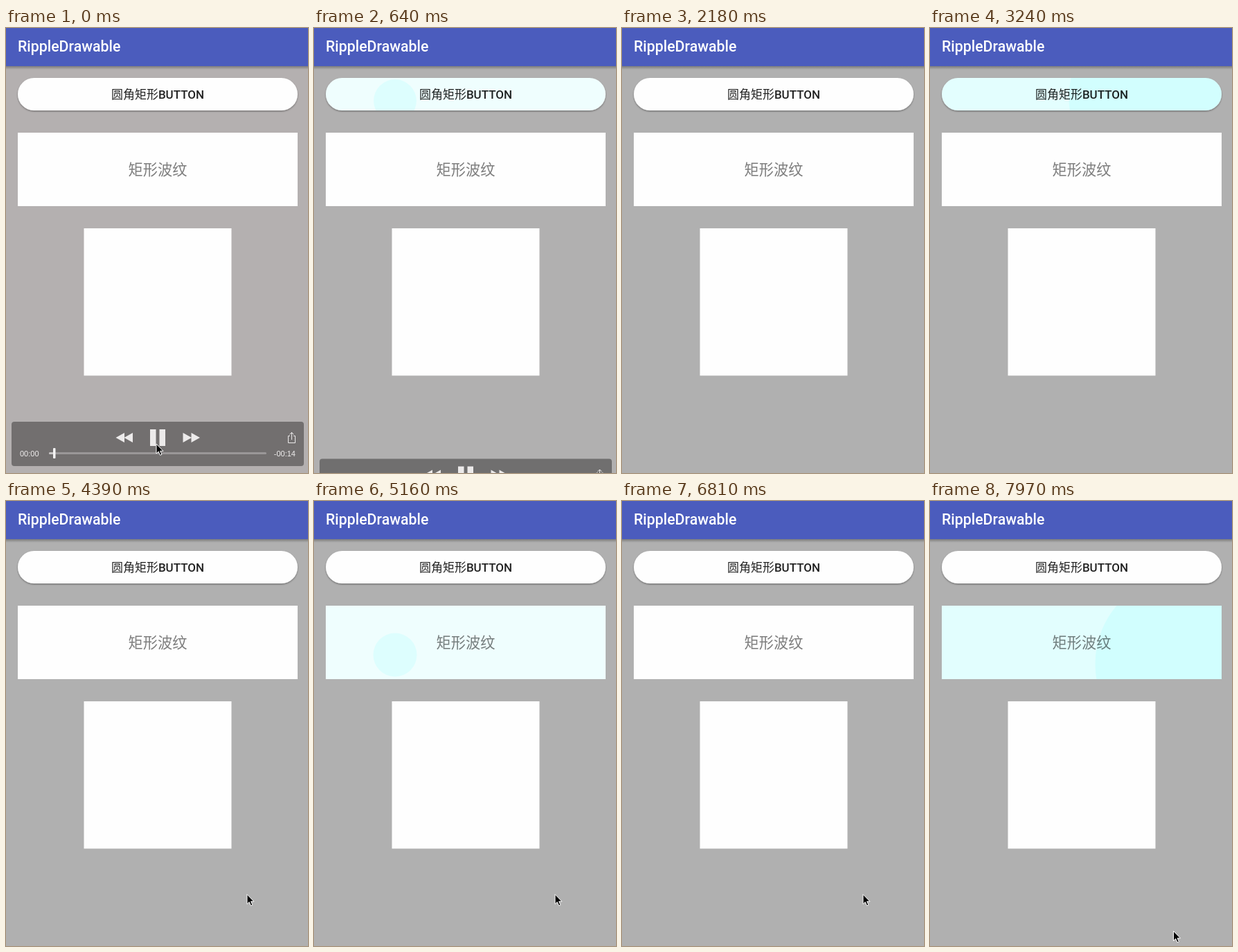
An HTML page for the animation above (8000 ms loop, 436 px wide and 642 px high).

```html
<!DOCTYPE html>
<html lang="zh">
<head>
<meta charset="utf-8">
<title>Ripple</title>
<style>
html, body { margin: 0; width: 100%; height: 100%; overflow: hidden; background: #b0b0b0; }
svg { display: block; width: 436px; height: 642px; }
text { font-family: Roboto, "Noto Sans CJK SC", "Noto Sans CJK", sans-serif; }
.medium { font-weight: 500; }
.panel text { font: 11px "Liberation Sans", Arial, sans-serif; fill: #f0eeee; }
</style>
</head>
<body>
<svg viewBox="0 0 436 642">
  <defs>
    <linearGradient id="shade" x2="0" y2="1">
      <stop stop-color="#000" stop-opacity=".3"/>
      <stop offset="1" stop-color="#000" stop-opacity="0"/>
    </linearGradient>
    <filter id="soft" x="-5%" y="-20%" width="110%" height="150%">
      <feDropShadow dx="0" dy="1.3" stdDeviation="1" flood-opacity=".38"/>
    </filter>
    <clipPath id="pillClip"><rect x="17" y="72" width="404" height="47" rx="23.5"/></clipPath>
    <clipPath id="cardClip"><rect x="17" y="151" width="404" height="106"/></clipPath>
  </defs>

  <rect id="back" width="436" height="642"/>
  <rect y="55" width="436" height="5" fill="url(#shade)"/>
  <rect width="436" height="55" fill="#4b5cbd"/>
  <text class="medium" x="17" y="34" font-size="21.3" fill="#fff">RippleDrawable</text>

  <rect x="17" y="72" width="404" height="47" rx="23.5" fill="#fefefe" filter="url(#soft)"/>
  <g id="pill" clip-path="url(#pillClip)" fill="#0ff">
    <rect x="17" y="72" width="404" height="47"/><circle/>
  </g>
  <text x="219" y="102.3" font-size="17" text-anchor="middle" fill="#000" fill-opacity=".87">圆角矩形<tspan class="medium">BUTTON</tspan></text>

  <rect x="17" y="151" width="404" height="106" fill="#fefefe"/>
  <g id="card" clip-path="url(#cardClip)" fill="#0ff">
    <rect x="17" y="151" width="404" height="106"/><circle/>
  </g>
  <text x="219" y="212" font-size="21.2" text-anchor="middle" fill="#000" fill-opacity=".51">矩形波纹</text>

  <rect x="112.5" y="289" width="213" height="212.5" fill="#fefefe"/>

  <g id="panel" class="panel">
    <rect x="8" y="568" width="422" height="64" rx="4" fill="#000" fill-opacity=".37"/>
    <path fill="#eceaea" d="M171 584V598L158.500 591ZM183 584V598L170.500 591ZM255.500 584V598L268 591ZM267.500 584V598L280 591ZM208 579h8.500v24h-8.500ZM221.500 579h8.500v24h-8.500Z"/>
    <path fill="none" stroke="#eceaea" d="M410 588.500H407.500V598.500H417.500V588.500H415M412.500 594V583.500M409.500 586.500L412.500 583.500L415.500 586.500"/>
    <rect x="62" y="612" width="314" height="3" rx="1.5" fill="#9a9798"/>
    <rect x="62" y="612" width="7" height="3" rx="1.5" fill="#c8c6c6"/>
    <rect x="68" y="606" width="3.500" height="15" rx="1" fill="#f4f3f3"/>
    <text x="20" y="618">00:00</text>
    <text x="418" y="618" text-anchor="end">-00:14</text>
  </g>

  <path id="cursor" d="M0 0V14L3.200 11L5.500 16.300L7.900 15.300L5.600 10.300H10Z" fill="#000" stroke="#fff" stroke-width="1"/>
</svg>
<script>
const LOOP = 8000;
const $ = id => document.getElementById(id);
const clamp = v => Math.min(1, Math.max(0, v));

// start, end, touch point
const presses = {
  pill: [[292, 2180, 117, 105], [2600, 4390, 318, 100]],
  card: [[4810, 6810, 117, 222], [7290, 8000, 368, 235]]
};
const panelY = [[60, 0], [820, 70], [1140, 70], [1300, 75]];
const cursorX = [[60, 217], [3440, 344], [3700, 348], [7700, 348], [7950, 351.5]];
const cursorY = [[60, 600], [420, 660], [3400, 660], [3490, 613], [3700, 567.5], [7700, 567.5], [7950, 620.5]];

// Piecewise linear value of a key list
function track(keys, t) {
  let [t0, v0] = keys[0];
  for (const [t1, v1] of keys) {
    if (t < t1) return t1 > t0 ? v0 + (v1 - v0) * clamp((t - t0) / (t1 - t0)) : v1;
    [t0, v0] = [t1, v1];
  }
  return v0;
}

function ripple(id, t) {
  const press = presses[id].find(([from, to]) => t >= from && t < to);
  const [tint, wave] = $(id).children;
  $(id).style.display = press ? "" : "none";
  if (!press) return;
  const [from, , x, y] = press, age = t - from + 20;
  tint.setAttribute("opacity", 0.12 * clamp(age / 760));
  wave.setAttribute("opacity", 0.076 * clamp(age / 360));
  wave.setAttribute("cx", x);
  wave.setAttribute("cy", y);
  wave.setAttribute("r", Math.max(0, 0.297 * (t - from - 245)));
}

function draw(now) {
  const t = now % LOOP;
  const warm = 1 - clamp((t - 60) / 700);
  $("back").setAttribute("fill", `rgb(${176 + 4 * warm},176,176)`);
  ripple("pill", t);
  ripple("card", t);
  $("panel").setAttribute("transform", `translate(0 ${track(panelY, t)})`);
  $("cursor").setAttribute("transform", `translate(${track(cursorX, t)} ${track(cursorY, t)})`);
}

const begin = performance.now();
function tick() {
  draw(performance.now() - begin);
  requestAnimationFrame(tick);
}
tick();
</script>
</body>
</html>
```
